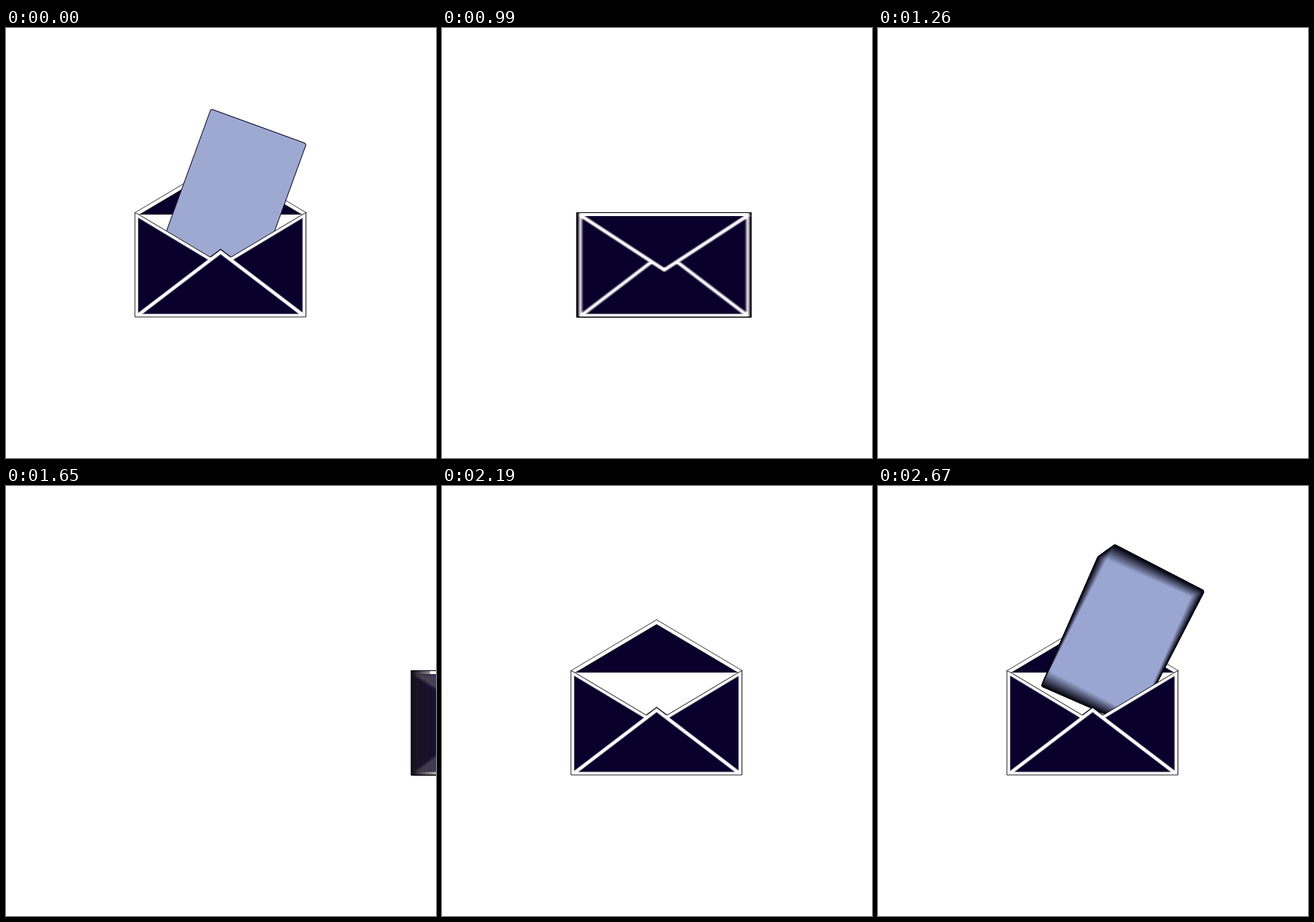
An HTML page with a canvas that plays this animation: 567 by 567 pixels, repeating every 2.7 s.

```html
<!DOCTYPE html>
<html lang="en">
<head>
<meta charset="utf-8">
<title>Envelope</title>
<style>
  html, body { margin: 0; width: 100%; height: 100%; overflow: hidden; background: #fff; }
  canvas { display: block; }
</style>
</head>
<body>
<canvas id="stage" width="567" height="567"></canvas>
<script>
const SIZE = 567, LOOP = 2700, STEP = 30, SHUTTER = 15, SAMPLES = 16;
const NAVY = '#0a002c', PAPER = '#9ea9d2', SHADE = '#04000f';
const ctx = document.getElementById('stage').getContext('2d');
const layer = document.createElement('canvas');
layer.width = layer.height = SIZE;
const lctx = layer.getContext('2d');

// [time, value] pairs
const SLIDE = [[960, 0], [1116, 42], [1265, -385], [1650, 409], [1802, -43], [2005, 0]];
const FLAP = [[515, 179.5], [690, 319], [2000, 319], [2165, 179.5]];

const lerp = (a, b, k) => a + (b - a) * k;

function track(keys, t) {
  const i = keys.findIndex(k => k[0] > t);
  if (i === 0) return keys[0][1];
  if (i < 0) return keys[keys.length - 1][1];
  const [t0, a] = keys[i - 1], [t1, b] = keys[i];
  return lerp(a, b, (t - t0) / (t1 - t0));
}

function path(c, points, close) {
  c.beginPath();
  for (let i = 0; i < points.length; i += 2) c.lineTo(points[i], points[i + 1]);
  if (close) c.closePath();
}

function fill(c, color, points) {
  path(c, points, true);
  c.fillStyle = color;
  c.fill();
}

function line(c, color, width, points) {
  path(c, points);
  c.strokeStyle = color;
  c.lineWidth = width;
  c.stroke();
}

function glowLine(c, points) {
  line(c, 'rgba(255,255,255,.35)', 5.6, points);
  line(c, '#fff', 4, points);
}

function flap(c, apex) {
  const legs = [171, 246, 283, apex, 395, 246];
  const open = apex < 246;
  fill(c, NAVY, legs);
  if (open) {
    line(c, '#000', 6, legs);
    line(c, '#fff', 4.6, legs);
  } else {
    glowLine(c, legs);
    line(c, '#fff', 4, [171, 246, 395, 246]);
  }
}

function pocket(c) {
  const edge = [170, 243.5, 176, 246.5, 269, 302, 283, 291.5, 297, 302, 390, 246.5,
    395.5, 243.5, 395.5, 381, 170, 381, 170, 243.5];
  c.save();
  path(c, edge, true);
  c.clip();
  c.fillStyle = NAVY;
  c.fill();
  glowLine(c, [168, 243.7, 270, 305]);
  glowLine(c, [398, 243.7, 296, 305]);
  glowLine(c, [171, 381, 283, 295.5, 395, 381]);
  glowLine(c, [172, 243, 172, 379.3, 393.3, 379.3, 393.3, 243]);
  c.restore();
  line(c, 'rgba(0,0,0,.85)', 1, edge);
}

function back(c, t) {
  const apex = track(FLAP, t);
  if (apex < 246) flap(c, apex);
  fill(c, '#fff', [174, 246, 283, 312, 392, 246]);
}

function front(c, t) {
  const apex = track(FLAP, t);
  pocket(c);
  if (apex >= 246) flap(c, apex);
}

function paintEnvelope(c, t, shadow) {
  c.save();
  c.translate(track(SLIDE, t), 0);
  if (shadow) {
    c.fillStyle = SHADE;
    c.fillRect(169.5, 243, 226.5, 138.5);
  } else {
    back(c, t);
    front(c, t);
  }
  c.restore();
}

// s is the time since the loop start, negative while the letter flies in
function paintLetter(c, s, shadow) {
  const n = s / STEP, k = Math.min(1, s / 450);
  const [x, y, angle] = s < 0
    ? [301 - 26.7 * n, 218 + 26.8 * n, 20 - 7.3 * n]
    : [lerp(301, 283, k), lerp(218, 318, k), lerp(20, -90, k)];
  c.save();
  c.translate(x, y);
  c.rotate(angle * Math.PI / 180);
  c.beginPath();
  c.roundRect(-67, -94, 134, 188, 3);
  c.fillStyle = shadow ? SHADE : PAPER;
  c.fill();
  c.strokeStyle = shadow ? SHADE : '#0a0620';
  c.lineWidth = 1;
  c.stroke();
  c.restore();
}

// Motion blur: running average of several poses over their dark common shape
function smear(paint, t) {
  const times = Array.from({ length: SAMPLES }, (_, i) => t + SHUTTER * i / (SAMPLES - 1));
  times.forEach((time, i) => {
    lctx.clearRect(0, 0, SIZE, SIZE);
    times.forEach(u => paint(lctx, u, true));
    paint(lctx, time, false);
    ctx.globalAlpha = 1 / (i + 1);
    ctx.drawImage(layer, 0, 0);
  });
  ctx.globalAlpha = 1;
}

function drawLetter(t) {
  const s = t >= 2400 ? t - LOOP : t;
  if (s > 690) return;
  ctx.save();
  path(ctx, [0, 0, SIZE, 0, SIZE, 245, 392, 245, 283, 312, 174, 245, 0, 245], true);
  ctx.clip();
  if (s < 0) smear(paintLetter, s);
  else paintLetter(ctx, s, false);
  ctx.restore();
}

function draw(t) {
  ctx.fillStyle = '#fff';
  ctx.fillRect(0, 0, SIZE, SIZE);
  if (t >= 1260 && t < 1650) return;
  if (t > 960 && t < 2005) {
    smear(paintEnvelope, t);
    ctx.fillStyle = '#fff';
    ctx.fillRect(172.5 + track(SLIDE, t + SHUTTER / 2), 244, 220.5, 4);
  } else {
    back(ctx, t);
    drawLetter(t);
    front(ctx, t);
  }
}

let shown = -1;
const start = performance.now();
function tick() {
  const t = Math.floor((performance.now() - start) % LOOP / STEP) * STEP;
  if (t !== shown) draw(shown = t);
  requestAnimationFrame(tick);
}
tick();
</script>
</body>
</html>
```
